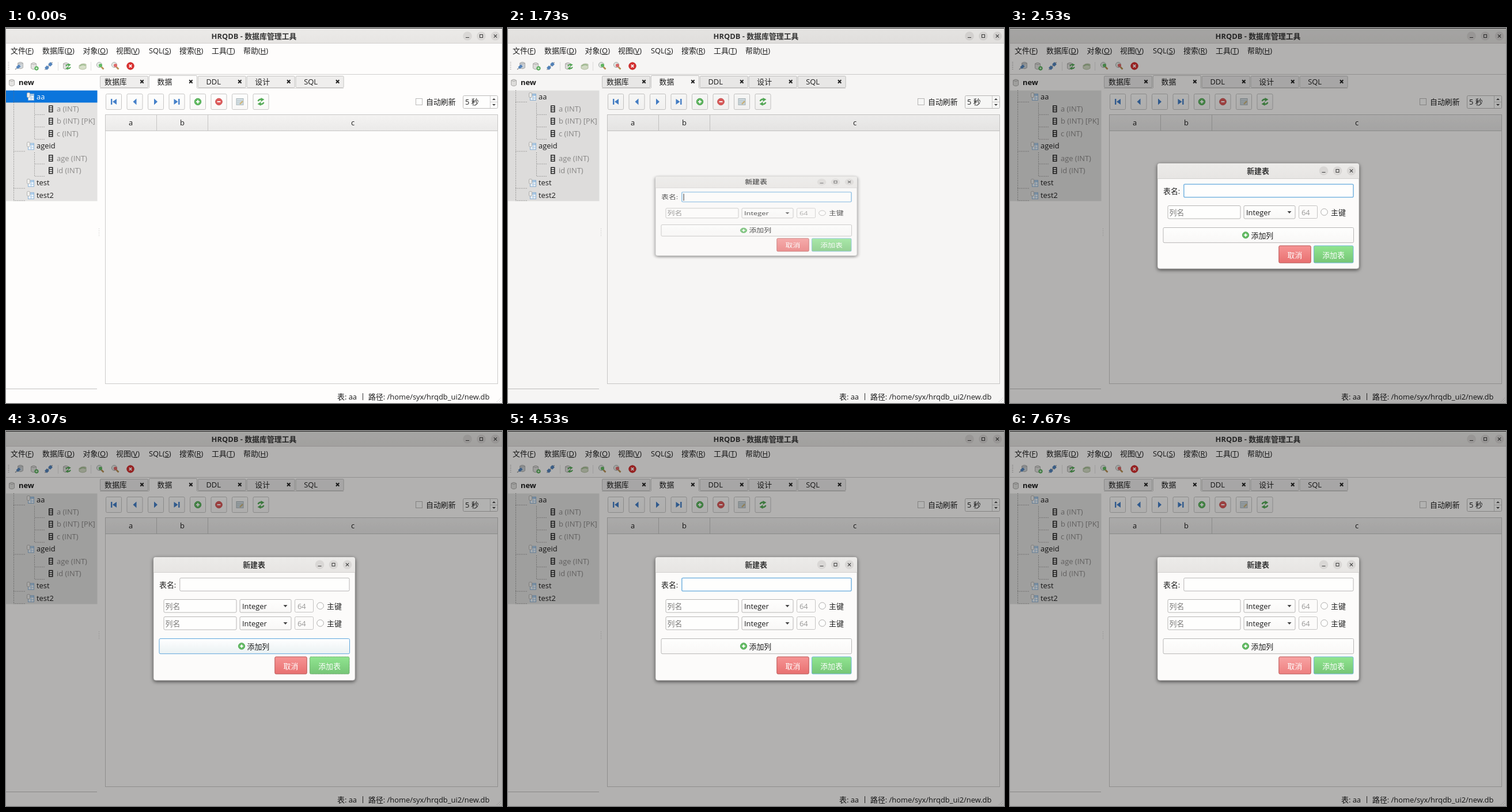
These frames come from a looping animation (861x651 px, 8000 ms). An HTML page:

```html
<!DOCTYPE html>
<html lang="zh-CN">
<head>
<meta charset="utf-8">
<title>HRQDB</title>
<style>
html, body { margin: 0; width: 100%; height: 100%; overflow: hidden; background: #fefdfc; }
svg { display: block; width: 861px; height: 651px; }
text { font: 12.9px "Open Sans", "Noto Sans CJK SC", "Noto Sans CJK JP", sans-serif; fill: #1c1c1c; white-space: pre; }
.b { font-weight: 700; }
.m { text-anchor: middle; }
.u { text-decoration: underline; }
</style>
</head>
<body>
<svg id="stage" viewBox="0 0 861 651" xmlns="http://www.w3.org/2000/svg">
  <defs>
    <linearGradient id="bar" x2="0" y2="1"><stop stop-color="#ecebe9"/><stop offset="1" stop-color="#e7e5e3"/></linearGradient>
    <linearGradient id="head" x2="0" y2="1"><stop stop-color="#f4f3f2"/><stop offset="1" stop-color="#ebeae9"/></linearGradient>
    <linearGradient id="plain" x2="0" y2="1"><stop stop-color="#fefefd"/><stop offset="1" stop-color="#f9f8f7"/></linearGradient>
    <linearGradient id="hover" x2="0" y2="1"><stop stop-color="#ffffff"/><stop offset="1" stop-color="#eaf1f3"/></linearGradient>
    <linearGradient id="red" x2="0" y2="1"><stop stop-color="#f69494"/><stop offset="1" stop-color="#e87070"/></linearGradient>
    <linearGradient id="redHover" x2="0" y2="1"><stop stop-color="#f8a3a3"/><stop offset="1" stop-color="#ed7f7f"/></linearGradient>
    <linearGradient id="green" x2="0" y2="1"><stop stop-color="#90e590"/><stop offset="1" stop-color="#76c576"/></linearGradient>
    <filter id="shadow" x="-10%" y="-15%" width="120%" height="135%">
      <feDropShadow dx="0" dy="2" stdDeviation="3" flood-color="#000" flood-opacity=".6"/>
    </filter>
  </defs>
  <g id="main"></g>
  <g id="menu"></g>
  <rect id="dim" width="861" height="651"/>
  <g id="dialog"></g>
</svg>
<script>
const LOOP = 8000, FRAME = 1000 / 15;
const BLUE = '#0b75dc', EDGE = '#c6c5c4', FOCUS = '#5ea6dc';
const $ = id => document.getElementById(id);

const rect = (x, y, w, h, fill = 'none', stroke = 'none', r = 0, more = '') =>
  `<rect x="${x}" y="${y}" width="${w}" height="${h}" rx="${r}" fill="${fill}" stroke="${stroke}" ${more}/>`;
const text = (x, y, s, cls = '', fill = '') =>
  `<text x="${x}" y="${y}" class="${cls}"${fill ? ` style="fill:${fill}"` : ''}>${s}</text>`;
const path = (d, stroke = '#444', w = 1, fill = 'none', more = '') =>
  `<path d="${d}" stroke="${stroke}" stroke-width="${w}" fill="${fill}" ${more}/>`;
const solid = (d, fill) => path(d, 'none', 0, fill);
const disc = (x, y, r, fill, stroke = 'none') =>
  `<circle cx="${x}" cy="${y}" r="${r}" fill="${fill}" stroke="${stroke}"/>`;
const cross = (x, y, r, color, w) =>
  path(`M${x - r} ${y - r}l${2 * r} ${2 * r}m0 ${-2 * r}l${-2 * r} ${2 * r}`, color, w);
const at = (x, y, s) => `<g transform="translate(${x} ${y})">${s}</g>`;

const plus = (x, y, r) => disc(x, y, r, '#62bb62', '#55a95a') +
  path(`M${x - r / 2} ${y}h${r}M${x} ${y - r / 2}v${r}`, '#fff', r / 3);
const minus = (x, y, r) => disc(x, y, r, '#df5c5c', '#c94a4a') +
  path(`M${x - r / 2} ${y}h${r}`, '#fff', r / 3);
const cylinder = (x, y, fill = '#e4e3e1') =>
  path(`M${x - 4.5} ${y - 4}v8q4.5 3.5 9 0v-8q-4.5 -3.5 -9 0q4.5 3 9 0`, '#b0afad', 1, fill);
const lens = (x, y, tint) => path(`M${x + 2.5} ${y + 2.5}l4 4`, '#b98f52', 2.6) +
  disc(x - 1, y - 1, 4.6, '#e6ebe6', '#a9b0ad') + disc(x + 1, y, 3, tint);
const swap = path('M-5 -1q2 -4 6 -3M5 1q-2 4 -6 3', '#55ab57', 2.4) + solid('M0 -7l6 3l-6 4zM0 7l-6 -3l6 -4z', '#55ab57');

function windowButtons(xs, y) {
  const [a, b, c] = xs;
  return xs.map(x => disc(x, y, 7.8, '#d9d7d5')).join('') +
    path(`M${a - 3} ${y + 2.5}h6`, '#3a3a3a') +
    rect(b - 2.5, y - 2.5, 5, 5, 'none', '#3a3a3a') + cross(c, y, 2.6, '#3a3a3a', 1.1);
}

function menuLabel(x, s, key, fill) {
  return text(x, 44, `${s}(<tspan class="u">${key}</tspan>)`, '', fill);
}

function toolbar() {
  const grip = path('M4.5 59v15', '#b5b4b3', 2, 'none', 'stroke-dasharray="1 2"');
  const plugs = path('M-6.5 6.5l13 -13', '#8a9097', 1.6) + path('M-5 5l4 -4M1 -1l4 -4', '#5585bd', 5.5);
  return grip + path('M90.5 59v15M147.5 59v15', '#e2e1e0') +
    cylinder(25, 65, '#cfd5da') + path('M16 72l3 -2.5', '#8a9097', 1.5) + path('M19 69.5l5 -4.5', '#5585bd', 4.5) +
    cylinder(48, 66) + plus(53, 70, 3.2) + at(74, 66, plugs) +
    cylinder(104, 66) + at(108, 67, `<g transform="scale(.8)">${swap}</g>`) +
    path('M127 70v-5q6 -5 12 -2v7q-6 4 -12 0z', '#b3bfa0', 1, '#d6dfc8') + path('M128 66q5 -4 10 -1', '#96b787', 1.6) +
    lens(163, 65, '#62bb62') + lens(189, 65, '#df6a6a') +
    disc(216, 66, 6.2, '#dc2f2f', '#c52828') + cross(216, 66, 2.3, '#fff', 1.7);
}

const tableIcon = (x, y) => rect(x + 2.5, y - 4.5, 10, 11, '#edf4fa', '#8fb4d6') +
  rect(x + 3, y - 4, 9, 3, '#a9cae8') +
  path(`M${x + 6} ${y + 2.5}h6.5M${x + 7.5} ${y - 1}v7`, '#a9cae8') +
  rect(x + .5, y - 6.5, 5, 8, '#efefed', '#b5b4b2', 1.5);
const columnIcon = y => rect(74.8, y - 5.2, 6, 10.4, '#f4f4f3', '#222', 0, 'stroke-width="1.5"') +
  path(`M75 ${y - 1.7}h6M75 ${y + 1.8}h6`, '#222', 1.3);

function tree(active) {
  const rows = ['aa', '>a (INT)', '>b (INT) [PK]', '>c (INT)', 'ageid', '>age (INT)', '>id (INT)', 'test', 'test2'];
  let s = rect(0, 108.5, 158.5, 192, '#e4e3e2'), dots = 'M13.5 108V300';
  if (active) s += rect(0, 108.5, 158.5, 21, BLUE);
  rows.forEach((row, i) => {
    const y = 119 + i * 21.4, child = row[0] === '>';
    dots += child ? `M49.5 ${y - 10}v20h19` : `M13.5 ${y + 9.5}h20`;
    s += child
      ? columnIcon(y) + text(88, y + 4.5, row.slice(1), '', '#8b8a89')
      : tableIcon(36, y) + text(53, y + 4.5, row, '', active && !i ? '#fff' : '');
  });
  return s + path(dots, '#6d6c6b', 1, 'none', 'stroke-dasharray="1 2"');
}

function tabs() {
  return ['数据库', '数据', 'DDL', '设计', 'SQL'].map((name, i) => {
    const x = 163 + i * 84.9, on = i === 1;
    return rect(x + .5, on ? 82.5 : 83.5, 83, on ? 23 : 20, on ? '#fefdfc' : '#efeeed', EDGE, 1.5) +
      (on ? rect(x, 104, 84, 3, '#fefdfc') : '') +
      text(x + (i ? 14.6 : 8), 98, name) + cross(x + 73, 93, 2.7, '#222', 2);
  }).join('');
}

function dataButtons() {
  const c = '#4580c9';
  const icons = [
    rect(-5, -5, 2.4, 10, c) + solid('M5 -5v10l-7 -5z', c),
    solid('M3 -5.5v11l-6 -5.5z', c),
    solid('M-3 -5.5v11l6 -5.5z', c),
    rect(2.6, -5, 2.4, 10, c) + solid('M-5 -5v10l7 -5z', c),
    plus(0, 0, 5.8), minus(0, 0, 5.8),
    rect(-6, -5.5, 12, 11, '#d3dee3', '#a9b6ba') + path('M-6 -1.5h12M-6 2h12', '#b9c8cc') + path('M0 4l5 -5', '#d0b67a', 2.4),
    swap
  ];
  return icons.map((icon, i) => {
    const x = 173.5 + i * 36.5;
    return rect(x, 114.5, 27, 27, 'url(#plain)', EDGE, 2) + at(x + 13.5, 128, icon);
  }).join('');
}

function mainWindow(active) {
  const menus = [[8, '文件', 'F'], [63, '数据库', 'D'], [133.5, '对象', 'O'], [191, '视图', 'V'],
    [248, 'SQL', 'S'], [301, '搜索', 'R'], [357, '工具', 'T'], [412, '帮助', 'H']];
  return rect(0, 0, 861, 651, '#fefdfc') + rect(0, 0, 861, 27, 'url(#bar)') + rect(0, 0, 861, 1, '#3b3a39') +
    path('M0 26.5h861', '#d3d1cf') +
    text(430.5, 19, 'HRQDB - 数据库管理工具', 'b m', '#333') + windowButtons([801, 825, 849.5], 14) +
    menus.map(m => menuLabel(...m)).join('') + toolbar() +
    path('M0 80.5h861', '#d0cfce') + path('M0 626.5h158', '#c2c1c0') +
    cylinder(10, 95) + text(22, 99, 'new', 'b') + tree(active) +
    path('M161.5 348v15', '#c9c8c7', 1, 'none', 'stroke-dasharray="1 2"') +
    path('M163 104.5h423', '#d4d3d2') + tabs() + dataButtons() +
    rect(711.5, 122.5, 11, 11, '#fefefd', '#bbbab9') + text(729, 133, '自动刷新') +
    rect(793.5, 117.5, 60, 22, '#fefefd', '#bbbab9', 2) + path('M840.5 118v21M841 128.5h12', '#d0cfce') +
    solid('M844 125l3 -3l3 3zM844 132l3 3l3 -3z', '#444') + text(797, 132.5, '5 秒') +
    rect(172.5, 150.5, 681, 467, '#fefdfc', '#cccbca') + rect(172.5, 150.5, 681, 28, 'url(#head)', EDGE) +
    path('M261.5 151v27M350.5 151v27', EDGE) +
    text(216.5, 169, 'a', 'm') + text(306, 169, 'b', 'm') + text(602, 169, 'c', 'm') +
    text(575, 645, '表: aa') + path('M619.5 634v12', '#333') + text(629, 645, '路径: /home/syx/hrqdb_ui2/new.db') +
    path('M852 649l7 -7M856 649l3 -3', '#b5b4b3', 1, 'none', 'stroke-dasharray="1 2"');
}

function objectMenu(hover) {
  return rect(130, 27, 52, 24, BLUE) + menuLabel(133.5, '对象', 'O', '#fff') +
    rect(130.5, 51.5, 106, 69, '#fefefd', '#a9a8a7') +
    (hover ? rect(131, 52, 105, 22.5, BLUE) : '') +
    ['新建表', '删除表', '清空表'].map((s, i) =>
      text(155, 67.5 + i * 23.2, s, '', hover && !i ? '#fff' : '')).join('');
}

function columnRow(y) {
  return rect(274, y + .5, 126, 22.5, '#fefefd', '#b7b6b5', 2) + text(276.5, y + 16.5, '列名', '', '#7b7a79') +
    rect(406, y + .5, 89, 22.5, 'url(#plain)', '#b7b6b5', 2) + text(410, y + 16.5, 'Integer') +
    solid(`M481.5 ${y + 10}h7l-3.5 4z`, '#444') +
    rect(501.5, y + .5, 32, 22, '#fcfbfa', '#c4c3c2', 2) + text(506, y + 16.5, '64', '', '#9b9a99') +
    disc(545.5, y + 11.5, 5.8, '#fefefd', '#acabaa') + text(557, y + 17, '主键');
}

function tableDialog(s) {
  const top = s.rows > 1 ? 219 : 235, extra = (s.rows - 1) * 30;
  const add = top + 111 + extra, foot = top + 143 + extra;
  let out = `<g filter="url(#shadow)">${rect(256, top, 350, 183 + extra * 31 / 30, '#fcfbfa', '#8d8c8b', 4, 'stroke-width=".6"')}</g>` +
    solid(`M256 ${top + 26}v-22q0 -4 4 -4h342q4 0 4 4v22z`, 'url(#bar)') + path(`M256 ${top + 26.5}h350`, '#d2d0ce') +
    text(430.5, top + 18, '新建表', 'b m', '#333') + windowButtons([544.5, 568.5, 592.5], top + 13) +
    text(266, top + 53, '表名:');
  out += rect(301.8, top + 36.2, 294.2, 22.6, '#fefefd', s.field ? '#7db7e2' : '#b7b6b5', 2, s.field ? 'stroke-width="1.6"' : '');
  if (s.caret) out += rect(304.5, top + 40, 1.2, 16, '#222');
  for (let i = 0; i < s.rows; i++) out += columnRow(top + 73 + i * 30);
  out += rect(266, add + .5, 330.5, 26.2, s.addHover ? 'url(#hover)' : 'url(#plain)', s.addFocus ? FOCUS : '#b7b6b5', 2) +
    plus(409, add + 13.5, 5.6) + text(418.5, add + 18.5, '添加列') +
    rect(466.8, foot, 55.4, 29.8, s.cancelHover ? 'url(#redHover)' : 'url(#red)', '#b95555', 2) +
    text(494.5, foot + 20.5, '取消', 'm', '#fff') +
    rect(527.4, foot, 68.6, 29.8, 'url(#green)', s.addFocus ? '#4d924d' : '#74b7df', 2, s.addFocus ? 'stroke-dasharray="1.5 1"' : '') +
    text(561.5, foot + 20.5, '添加表', 'm', '#fff');
  if (s.popup) {
    out += rect(405.5, 292.5, 90, 71, '#fefefd', '#9d9c9b') + rect(406, 293, 89, 23.5, BLUE) +
      ['Integer', 'Real', 'VarChar(n)'].map((name, i) =>
        text(412.5, 309.5 + i * 23.2, name, '', i ? '' : '#fff')).join('');
  }
  return out;
}

const drawn = {};
function draw(id, build, state) {
  const key = JSON.stringify(state);
  if (drawn[id] === key) return;
  drawn[id] = key;
  $(id).innerHTML = state === null ? '' : build(state);
}

const clamp = v => Math.max(0, Math.min(1, v));

function update(t) {
  const within = (a, b) => t >= a && t < b;
  const tick = Math.floor((t + 4) / FRAME) * FRAME;
  const open = clamp((tick - 1683) / 100), eased = open * (2 - open);

  draw('main', mainWindow, tick < 1683);
  draw('menu', objectMenu, within(670, 1600) ? t >= 1400 : null);
  $('dim').setAttribute('opacity', .3 * clamp((tick - 1683) / 500));

  draw('dialog', tableDialog, open ? {
    rows: t < 2870 ? 1 : 2,
    field: t < 2870 || within(3930, 5330),
    caret: t < 2330 || within(2670, 2870) || within(3930, 4530) || within(5070, 5330),
    addFocus: within(2870, 3930),
    addHover: within(2670, 3670),
    popup: within(5330, 7270),
    cancelHover: t >= 7670
  } : null);
  $('dialog').setAttribute('opacity', eased);
  $('dialog').setAttribute('transform', `translate(0 ${326.5 * (1 - eased)}) scale(1 ${eased})`);
}

let start;
function loop(now) {
  start ??= now;
  update((now - start) % LOOP);
  requestAnimationFrame(loop);
}
update(0);
requestAnimationFrame(loop);
</script>
</body>
</html>
```
